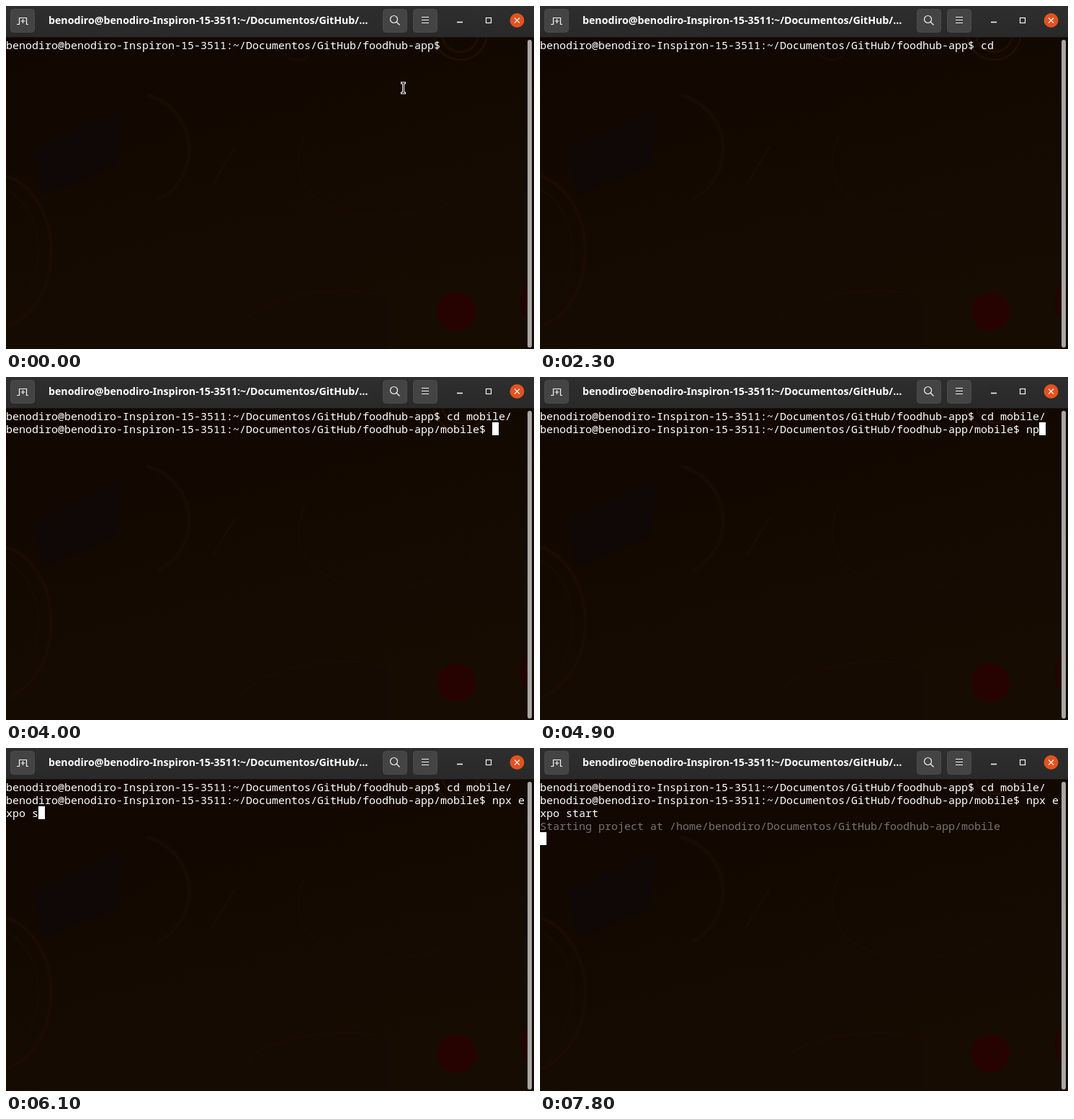
These frames come from a looping animation (733x477 px, 8000 ms). An HTML page:

```html
<!DOCTYPE html>
<html lang="pt">
<head>
<meta charset="utf-8">
<title>Terminal</title>
<style>
  html, body { margin: 0; width: 100%; height: 100%; overflow: hidden; background: #120900; }
  svg { display: block; width: 733px; height: 477px; }
  .title { font: 700 14.2px "Noto Sans", "Open Sans", sans-serif; fill: #fff; }
  .row { font: 15px "Noto Sans Mono", "DejaVu Sans Mono", monospace; fill: #fff; white-space: pre; }
  .dim { fill: #78736d; }
  .icon { fill: none; stroke: #f2f2f2; stroke-width: 1.2; }
  .pointer { animation: hide 8s step-end infinite; }
  @keyframes hide { 0% { opacity: 1; } 12.5%, 100% { opacity: 0; } }
</style>
</head>
<body>
<svg viewBox="0 0 733 477">
  <defs>
    <linearGradient id="desk" x2=".4" y2="1">
      <stop stop-color="#100600"/><stop offset="1" stop-color="#170c02"/>
    </linearGradient>
    <linearGradient id="bar" x2="0" y2="1">
      <stop stop-color="#2e2e2e"/><stop offset="1" stop-color="#292929"/>
    </linearGradient>
  </defs>

  <!-- wallpaper showing faintly through the terminal -->
  <rect width="733" height="477" fill="url(#desk)"/>
  <path d="M38 200L163 143L154 222L52 264Z" fill="#100707"/>
  <path d="M105 380L250 345L400 375L530 400V477H115Z" fill="#150b02"/>
  <g fill="none" stroke="#1b0b01">
    <path d="M0 236A82 108 0 0 1 0 446" stroke-width="5"/>
    <path d="M0 256A64 88 0 0 1 0 424" stroke-width="2"/>
    <path d="M195 124A78 78 0 0 1 210 270" stroke="#170b02" stroke-width="6"/>
    <path d="M415 180C385 240 430 290 510 292S630 275 648 246" stroke-width="2"/>
    <path d="M594 44A37 37 0 0 0 667 44M606 44A25 25 0 0 0 655 44" stroke="#200f02" stroke-width="3"/>
    <path d="M386 66Q402 82 420 70" stroke-width="3"/>
    <path d="M318 196L286 250M322 448Q350 410 420 400T535 405" stroke-width="3"/>
  </g>
  <circle cx="625.5" cy="425" r="27" fill="#270300"/>
  <path d="M721 385L714 410L718 432L724 430V385Z" fill="#210300"/>

  <g id="rows"></g>
  <rect id="cursor" width="9" height="18" fill="#fff"/>

  <rect x="724" y="47" width="6" height="428" rx="3" fill="#a9a7a4"/>

  <!-- header bar -->
  <rect width="733" height="44" fill="url(#bar)"/>
  <rect y="43" width="733" height="1" fill="#151515"/>
  <text class="title" x="59" y="25">benodiro@benodiro-Inspiron-15-3511:~/Documentos/GitHub/…</text>
  <g fill="#444" stroke="#4b4b4b">
    <rect x="6.5" y="4.5" width="33" height="32" rx="4"/>
    <rect x="523.5" y="4.5" width="33" height="32" rx="4"/>
    <rect x="565.5" y="4.5" width="33" height="32" rx="4"/>
  </g>
  <g class="icon">
    <path d="M15 25.5H18.5V16.5H28.5V25.5H31M20.5 21H26.5M23.5 18V24"/>
    <circle cx="538.5" cy="18.5" r="5"/>
    <path d="M542 22L546.5 26.5"/>
    <path d="M577 15.5H587M577 19.5H587M577 23.5H587"/>
    <path d="M626 22.5H634" stroke-width="1.6"/>
    <rect x="666.5" y="16.5" width="7" height="7"/>
  </g>
  <circle cx="709.5" cy="20" r="10" fill="#e2531f"/>
  <path class="icon" d="M706 16.5L713 23.5M713 16.5L706 23.5"/>

  <!-- mouse pointer -->
  <g class="pointer" fill="none">
    <path d="M548 107H555M551.5 106V122M548 121H555" stroke="#fff" stroke-width="3"/>
    <path d="M549 107H554M551.5 107V121M549 121H554" stroke="#000"/>
  </g>
</svg>
<script>
  const COLS = 80, CELL = 9, LINE = 18, TOP = 45, LOOP = 8000;
  const home = "benodiro@benodiro-Inspiron-15-3511:~/Documentos/GitHub/foodhub-app";
  const first = home + "$ ", second = home + "/mobile$ ";
  const cd = "cd mobile/", npx = "npx expo start";
  const log = "Starting project at /home/benodiro/Documentos/GitHub/foodhub-app/mobile";

  // [start in ms, characters typed so far]
  const cdKeys = [[0, 0], [1700, 2], [3500, 3], [3700, 4], [3900, 10]];
  const npxKeys = [[4000, 0], [4900, 2], [5100, 3], [5200, 4], [5300, 5], [5700, 7], [5800, 8],
                   [6100, 10], [6400, 11], [6600, 12], [6900, 13], [7300, 14]];
  const hidden = [[0, 300], [900, 1500], [2300, 2900]];

  const rows = document.getElementById("rows");
  const cursor = document.getElementById("cursor");
  const lines = Array.from({ length: 5 }, (_, i) => {
    const el = document.createElementNS("http://www.w3.org/2000/svg", "text");
    el.setAttribute("class", i === 3 ? "row dim" : "row");
    el.setAttribute("y", TOP + 15 + i * LINE);
    return rows.appendChild(el);
  });

  const typed = (text, keys, t) => text.slice(0, keys.filter(k => k[0] <= t).pop()[1]);

  function screenAt(t) {
    let out = first + typed(cd, cdKeys, t);
    if (t >= 4000) out += "\n" + second + typed(npx, npxKeys, t);
    if (t >= 7300) out += "\n";
    if (t >= 7800) out += log + "\n";
    return out.split("\n").flatMap(line => {
      const parts = [];
      for (let i = 0; i <= line.length; i += COLS) parts.push(line.slice(i, i + COLS));
      return parts;
    });
  }

  let shown = "";
  function draw() {
    const t = performance.now() % LOOP;
    const screen = screenAt(t);
    const key = screen.join("\n");
    if (key !== shown) {
      shown = key;
      lines.forEach((el, i) => el.textContent = screen[i] || "");
      cursor.setAttribute("x", screen[screen.length - 1].length * CELL);
      cursor.setAttribute("y", TOP + (screen.length - 1) * LINE);
    }
    const off = hidden.some(([from, to]) => t >= from && t < to);
    cursor.setAttribute("visibility", off ? "hidden" : "visible");
    requestAnimationFrame(draw);
  }
  draw();
</script>
</body>
</html>
```
